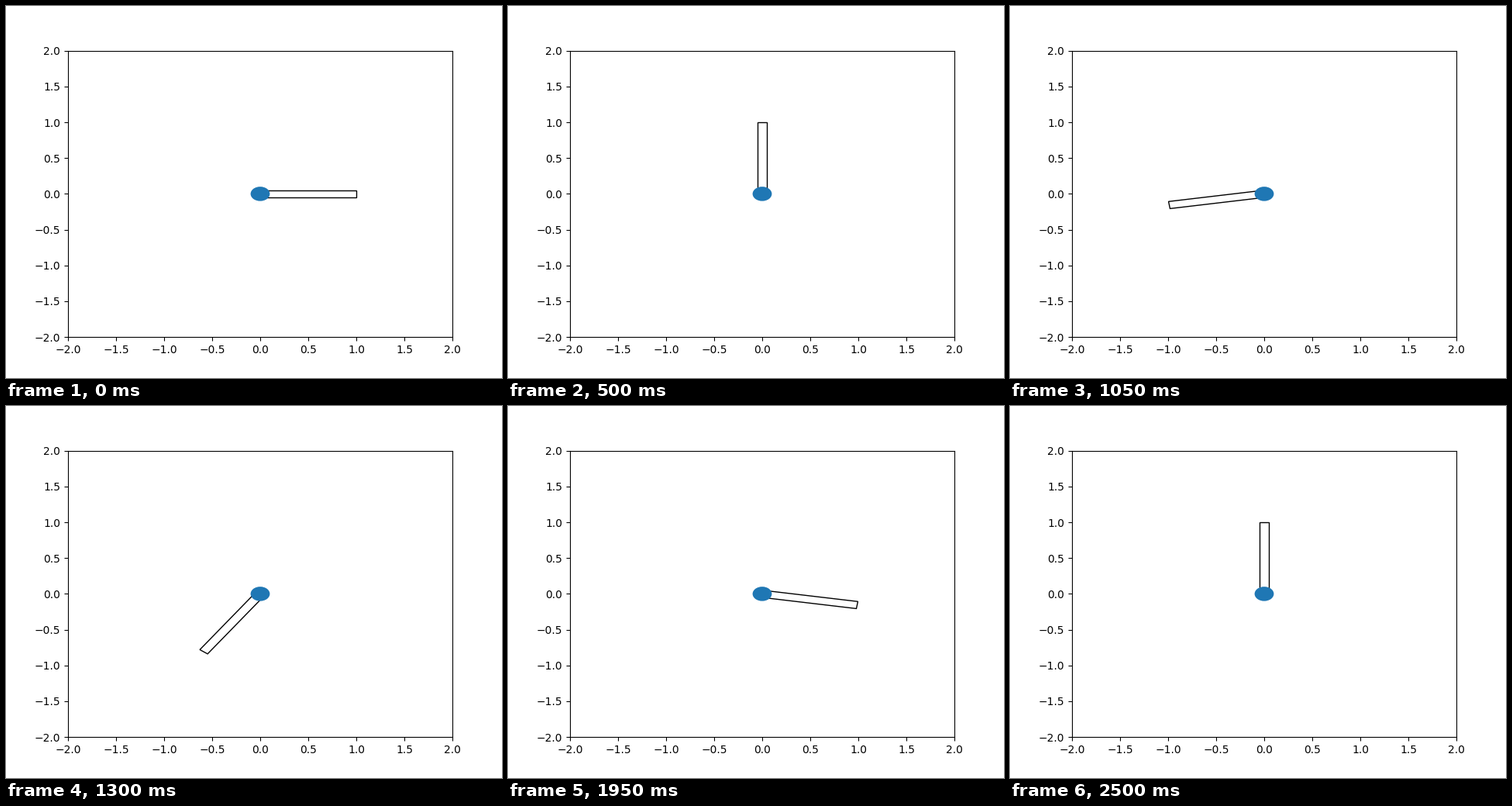
Animation, 640 px wide and 480 px high, one loop 2.55 s. Source, as a matplotlib script:

```python
import matplotlib.pyplot as plt
from matplotlib.animation import FuncAnimation
from matplotlib.patches import Circle, Rectangle

FRAMES = 51
INTERVAL = 50  # ms
STEP = 9       # degrees per frame

fig, ax = plt.subplots(figsize=(6.4, 4.8), dpi=100)
ax.set_xlim(-2, 2)
ax.set_ylim(-2, 2)

# The arm turns about the origin in data space; the hub covers its inner end.
arm = Rectangle((0, -0.05), 1, 0.1, rotation_point=(0, 0),
                fill=False, edgecolor="black", linewidth=1, zorder=1)
hub = Circle((0, 0), 0.1, facecolor="tab:blue", zorder=2)
ax.add_patch(arm)
ax.add_patch(hub)


def update(frame):
    arm.set_angle(STEP * frame)
    return (arm,)


anim = FuncAnimation(fig, update, frames=FRAMES, interval=INTERVAL,
                     repeat=True, repeat_delay=0)
plt.show()
```
